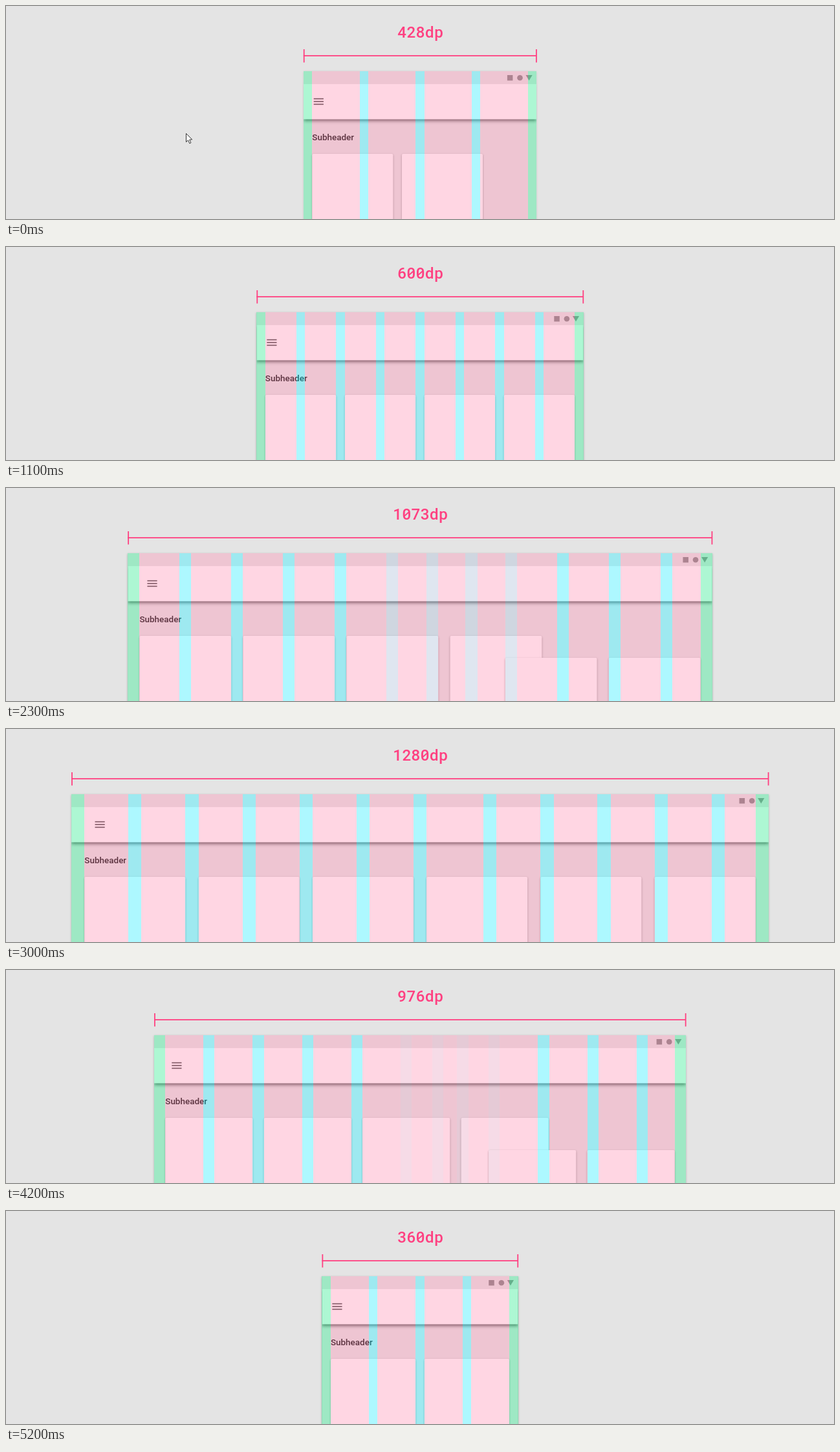
Recreate the animation shown at these times as an HTML page with a canvas. Size 1280 by 330 pixels, loop 5400 ms.

```html
<!DOCTYPE html>
<html lang="en">
<head>
<meta charset="utf-8">
<title>Responsive grid</title>
<style>
  html, body { margin: 0; width: 100%; height: 100%; overflow: hidden; background: #e4e4e4; }
  canvas { display: block; }
</style>
</head>
<body>
<canvas width="1280" height="330"></canvas>
<script>
const ctx = document.querySelector('canvas').getContext('2d');
const LOOP = 5400, STEP = 100;
const DP = 0.842;               // pixels per dp
const CENTER = 640, BOTTOM = 330;
const ACCENT = '#ff4081';

// The loop opens in the middle of the first move.
const moves = [
  { start: -380.3, duration: 1230, from: 360, to: 600 },
  { start: 1699.3, duration: 1170, from: 600, to: 1280 },
  { start: 3759.4, duration: 1328, from: 1280, to: 360 }
];

const lerp = (a, b, p) => a + (b - a) * p;
const clamp = v => Math.min(1, Math.max(0, v));

// Cubic bezier (.41, 0, .35, 1)
function ease(x) {
  if (x <= 0 || x >= 1) return clamp(x);
  let low = 0, high = 1;
  for (let i = 0; i < 40; i++) {
    const s = (low + high) / 2, u = 1 - s;
    if (1.23 * s * u * u + 1.05 * s * s * u + s * s * s < x) low = s;
    else high = s;
  }
  return low * low * (3 - 2 * low);
}

function widthAt(t) {
  const m = moves.filter(m => m.start <= t).pop();
  return lerp(m.from, m.to, ease((t - m.start) / m.duration));
}

function rect(x, y, w, h, color) {
  ctx.fillStyle = color;
  ctx.fillRect(x, y, w, h);
}

function polygon(points, color) {
  ctx.beginPath();
  points.forEach(([x, y]) => ctx.lineTo(x, y));
  ctx.closePath();
  ctx.fillStyle = color;
  ctx.fill();
}

function withShadow(alpha, blur, offset, draw) {
  ctx.save();
  ctx.shadowColor = `rgba(0,0,0,${alpha})`;
  ctx.shadowBlur = blur;
  ctx.shadowOffsetY = offset;
  draw();
  ctx.restore();
}

function layoutFor(dp) {
  const wide = dp > 600;
  const p = wide ? (dp - 600) / 680 : (dp - 360) / 240;
  const half = dp * DP / 2;
  return {
    dp, wide, p,
    left: CENTER - half,
    right: CENTER + half,
    gutter: (wide ? lerp(16, 24, p) : 16) * DP,
    pitch: (wide ? lerp(73, 314 / 3, p) : lerp(86, 73, p)) * DP
  };
}

function guttersFor({ dp, wide, p, left, right, gutter, pitch }) {
  const fade = clamp(2 * p - 1);
  const list = [];
  const add = (x, alpha) => alpha > 0 && list.push({ x, alpha });
  const fromLeft = (offset, alpha) => add(left + offset, alpha);
  const fromRight = (offset, alpha) => add(right - offset - gutter, alpha);
  if (wide) {
    const base = 73 * DP, last = 314 / 3 * DP;
    for (let i = 1; i <= 5; i++) fromLeft(i * pitch, i < 5 ? 1 : fade);
    for (let i = 1; i <= 4; i++) fromRight(i * pitch - gutter, i < 4 ? 1 : fade);
    fromLeft(lerp(5 * base, 6 * last, p), fade);
    fromRight(lerp(4 * base, 5 * last, p) - gutter, fade);
  } else {
    const pitch8 = (dp - 16) / 8 * DP;
    for (let i = 1; i <= 7; i++) fromLeft(i * pitch8, i % 2 ? fade : 1);
  }
  return list.sort((a, b) => a.x - b.x);
}

function drawLabel(dp) {
  const text = Math.round(dp) + 'dp', advance = 14.2;
  ctx.font = '500 24px Roboto, sans-serif';
  ctx.textAlign = 'center';
  ctx.fillStyle = ctx.strokeStyle = ACCENT;
  ctx.lineWidth = 1.8;
  [...text].forEach((char, i) => {
    const x = CENTER + 0.5 + (i - (text.length - 1) / 2) * advance;
    ctx.fillText(char, x, 49);
    if (char === '0') {
      ctx.beginPath();
      ctx.moveTo(x - 3.4, 43.5);
      ctx.lineTo(x + 3.4, 37.5);
      ctx.stroke();
    }
  });
}

function drawBracket({ left, right }) {
  rect(left, 76.2, right - left, 1.8, ACCENT);
  rect(left, 67, 1.8, 20.5, ACCENT);
  rect(right - 1.2, 67, 1.8, 20.5, ACCENT);
}

function drawCards({ wide, p, left, right, gutter, pitch }) {
  const width = 2 * pitch - gutter;
  const card = (x, y) => withShadow(0.35, 3, 1, () => {
    ctx.beginPath();
    ctx.roundRect(x, y, width, 200, 2);
    ctx.fillStyle = '#fff';
    ctx.fill();
  });
  for (let i = 0; i < (wide ? 4 : 2); i++) card(left + gutter + 2 * i * pitch, 229);
  const rise = (wide ? 112 : 150) * (1 - p);
  for (let i = 2; i >= 1; i--) card(right - 2 * i * pitch, 229 + rise);
}

function drawDevice(layout) {
  const { left, right, gutter, wide, p } = layout;
  const width = right - left;
  withShadow(0.25, 3, 1, () => rect(left, 101, width, 260, '#e9e9e9'));

  ctx.save();
  ctx.beginPath();
  ctx.rect(left, 101, width, BOTTOM - 101);
  ctx.clip();
  drawCards(layout);
  withShadow(0.55, 5, 2, () => rect(left, 121, width, 54.5, '#fff'));
  rect(left, 101, width, 20, '#e9e9e9');
  ctx.restore();

  const icon = 'rgba(0,0,0,.36)';
  rect(right - 45.3, 107, 8.5, 8.5, icon);
  ctx.beginPath();
  ctx.arc(right - 25.7, 111.2, 4.3, 0, 7);
  ctx.fill();
  polygon([[right - 16.7, 107], [right - 6.5, 107], [right - 11.6, 115.5]], icon);

  const menu = left + 23.5 + (wide ? 20.5 * p : 0);
  for (const y of [143.7, 148, 152.3]) rect(menu - 7.6, y - 0.85, 15.2, 1.7, 'rgba(0,0,0,.6)');

  ctx.font = '500 13.47px Roboto, sans-serif';
  ctx.textAlign = 'left';
  ctx.fillStyle = 'rgba(0,0,0,.8)';
  ctx.fillText('Subheader', left + gutter, 208);
}

function drawGrid(layout) {
  const { left, right, gutter } = layout;
  const strip = (from, to, rgb, alpha) => {
    const a = Math.round(from), b = Math.round(to);
    rect(a, 101, Math.max(0, b - a), BOTTOM - 101, `rgba(${rgb},${alpha})`);
  };
  const pink = '252,64,126', cyan = '0,232,255', green = '0,230,118';
  strip(left, left + gutter, green, 0.32);
  let edge = left + gutter;
  for (const { x, alpha } of guttersFor(layout)) {
    strip(edge, x, pink, 0.215);
    edge = x + gutter;
    strip(x, edge, pink, 0.215 * (1 - alpha));
    strip(x, edge, cyan, 0.32 * alpha);
  }
  strip(edge, right - gutter, pink, 0.215);
  strip(right - gutter, right, green, 0.32);
}

function drawPointer(t) {
  if (t >= 900) return;
  const q = clamp((t - 600) / 300) ** 2;
  ctx.save();
  ctx.translate(278.5 - 116 * q, 197.5 + 140 * q);
  polygon([[0, 0], [0, 13.2], [3, 10.4], [5.3, 15.4], [7.4, 14.4], [5.2, 9.6], [9.2, 9.4]], '#fff');
  ctx.strokeStyle = '#333';
  ctx.lineWidth = 1;
  ctx.stroke();
  ctx.restore();
}

const began = performance.now();
function frame() {
  const elapsed = (performance.now() - began) % LOOP;
  const t = Math.floor(elapsed / STEP) * STEP;
  const layout = layoutFor(widthAt(t));
  rect(0, 0, 1280, 330, '#e4e4e4');
  drawLabel(layout.dp);
  drawBracket(layout);
  drawDevice(layout);
  drawGrid(layout);
  drawPointer(t);
  requestAnimationFrame(frame);
}
frame();
</script>
</body>
</html>
```
